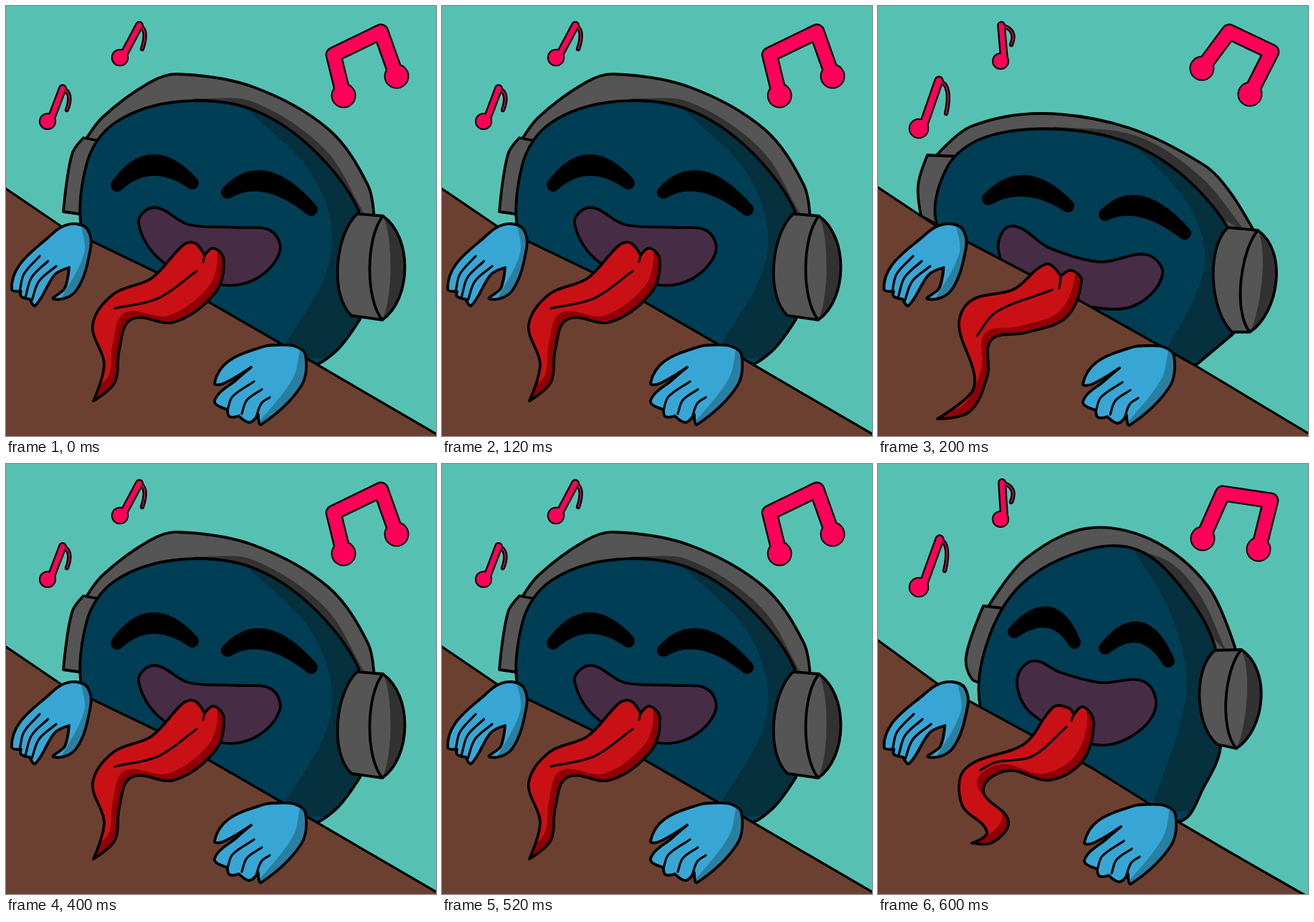
Write an HTML page that moves like this. It is 600 by 600 pixels and loops after 800 ms.

```html
<!DOCTYPE html>
<html lang="en">
<head>
<meta charset="utf-8">
<title>Headphone jam</title>
<style>
  html, body { margin: 0; width: 100%; height: 100%; overflow: hidden; background: #56c1b2; }
  svg { display: block; width: 100%; height: 100%; }
  .pose { opacity: 0; }
</style>
</head>
<body>
<svg id="stage" viewBox="0 0 600 600" fill="none" stroke-linejoin="round" stroke-linecap="round"></svg>
<script>
const INK = '#000';
const C = {
  head: '#003e55', headDark: '#05303e', mouth: '#472c45',
  tongue: '#c91115', tongueDark: '#8f0006',
  hand: '#38a6d4', handDark: '#2a7fa0',
  grey: '#555', greyDark: '#323232',
  table: '#6b4030', note: '#ff0059'
};
const STEP = 200;
const ORDER = [0, 1, 0, 2];

// Key points are "x,y"; a trailing "!" marks a sharp corner.
const POSES = [
  {
    table: '0,255 78,308 215,374 425,495 600,597',
    head: '110,330 112,222 152,163 245,133 350,147 445,217 500,310 494,437! 460,482 420,503 200,480',
    headShade: '335,142 430,240 453,350 378,492',
    band: '108,192! 135,155 200,107 240,95 345,113 450,172 505,250 514,300! 480,330! 130,260!',
    bandShade: '262,129 345,134 445,200 500,290',
    cupL: '108,184! 140,190! 115,292! 80,287! 92,207',
    cupR: '490,290 526,293 525,438 482,432',
    eyes: ['155,250 205,222 260,247', '309,260 363,245 426,284'],
    mouth: '185,303 207,281 255,305 325,309 370,314 382,343 350,380 302,389 220,358',
    tongue: '122,551! 137,500 121,445 150,402 203,380 248,333 264,331 277,348! 290,338 304,355 292,400 235,441 175,437 158,480 152,525',
    creases: ['152,422 212,408 266,370', '277,348 275,357'],
    handL: 'scale(1 1)', handR: 'translate(0 0)',
    notes: ['159,72 186,27 190,60', '58,161 79,115 85,145'],
    beam: '471,125 457,68 523,36 545,98'
  },
  {
    table: '0,253 75,303 283,412 445,503 600,596',
    head: '84,310 96,226 150,183 255,172 362,196 452,262 505,350 496,457! 445,500! 200,480',
    headShade: '354,190 435,280 455,365 395,495',
    band: '82,208! 130,168 230,150 350,170 455,222 490,258 524,313! 480,340! 106,250!',
    bandShade: '243,168 360,181 450,238 513,315',
    cupL: '69,208! 112,210! 95,312! 60,293! 56,250',
    cupR: '488,309 530,313 519,455 494,455',
    eyes: ['154,269 207,251 265,279', '317,291 368,280 428,317'],
    mouth: '168,340 186,307 240,338 310,357 375,347 397,375 360,417 305,421 200,395',
    tongue: '83,576! 130,540 134,512 113,445 130,411 190,395 235,360 255,377! 270,369 284,384 262,435 205,456 158,466 153,515 128,566',
    creases: ['138,460 165,427 243,396', '255,377 253,394'],
    handL: 'scale(1.04 1)', handR: 'translate(-5 1)',
    notes: ['171,77 172,27 186,54', '57,171 85,104 95,150'],
    beam: '452,87 490,36 549,64 519,123'
  },
  {
    table: '0,246 82,306 300,425 420,500 490,541 600,604',
    head: '143,340 152,250 200,168 290,120 365,121 430,181 472,262 478,394 455,450 419,499 200,480',
    headShade: '354,114 411,215 430,320 380,485',
    band: '152,202! 205,133 290,90 380,105 460,170 500,262! 460,300! 170,260!',
    bandShade: '355,117 410,139 450,184 487,264',
    cupL: '147,198! 180,202! 150,306! 131,300 123,268',
    cupR: '470,260 507,259 500,397 473,391',
    eyes: ['190,234 238,214 274,249', '317,257 365,235 405,275'],
    mouth: '194,303 215,275 255,291 310,305 372,304 387,342 350,382 300,391 214,348',
    tongue: '131,529! 152,513 117,475 122,425 205,390 245,339 267,341 273,350! 287,339 301,362 285,415 240,441 180,428 147,455 182,498 160,528',
    creases: ['143,427 165,416 215,408 263,367', '273,350 270,358'],
    handL: 'scale(1.06 1)', handR: 'translate(-3 2)',
    notes: ['171,77 173,26 186,53', '57,172 86,105 93,149'],
    beam: '453,104 481,41 548,51 531,119'
  }
];

// Each finger line repeats the first one, moved on by a fixed step.
const HANDS = {
  handL: {
    edge: '78,308 98,304 114,312 118,338 98,397 67,409 82,394 88,365! 68,375 41,418 33,409! 21,405 21,398! 8,395 19,361 60,322',
    shade: '104,302 109,345 75,412',
    lines: { from: [19, 399, 8.5, 6], via: [25, 374, 10.5, 5], to: [47, 349, 11.5, 7] }
  },
  handR: {
    edge: '381,473 404,475 418,487 412,530 356,584 352,570! 340,581 325,572! 312,573 309,563! 291,551 322,521 342,504! 303,527 291,526 310,496 360,475',
    shade: '411,474 400,520 345,590',
    lines: { from: [309, 564, 20, 5], via: [316, 545, 20, 5], to: [346, 524, 11, 11] }
  }
};

const points = text => text.split(' ').map(s => {
  const [x, y] = s.split(',').map(parseFloat);
  return { x, y, sharp: s.endsWith('!') };
});

// Smooth path through the points, with handles scaled to each span.
function curve(text, closed = true) {
  const pts = points(text);
  const n = pts.length;
  const at = i => closed ? pts[(i + n) % n] : pts[Math.max(0, Math.min(n - 1, i))];
  const handle = (i, len) => {
    const p = at(i), a = at(i - 1), b = at(i + 1);
    const dx = b.x - a.x, dy = b.y - a.y;
    const k = p.sharp ? 0 : len / 3 / (Math.hypot(dx, dy) || 1);
    return [dx * k, dy * k];
  };
  let d = `M${pts[0].x} ${pts[0].y}`;
  for (let i = 0; i < (closed ? n : n - 1); i++) {
    const p = at(i), q = at(i + 1);
    const len = Math.hypot(q.x - p.x, q.y - p.y);
    const [ax, ay] = handle(i, len), [bx, by] = handle(i + 1, len);
    d += `C${p.x + ax} ${p.y + ay} ${q.x - bx} ${q.y - by} ${q.x} ${q.y}`;
  }
  return closed ? d + 'Z' : d;
}

// Bulging edge from p to q, k pixels sideways at its middle.
function bow(p, q, k) {
  const side = k * 4 / 3, dy = (q.y - p.y) / 5;
  return `C${p.x + side} ${p.y + dy} ${q.x + side} ${q.y - dy} ${q.x} ${q.y}`;
}

const stage = document.getElementById('stage');
let clips = 0;

function add(parent, tag, attrs) {
  const el = document.createElementNS('http://www.w3.org/2000/svg', tag);
  for (const k in attrs) el.setAttribute(k, attrs[k]);
  parent.appendChild(el);
  return el;
}

function line(g, d, width = 3.2) {
  add(g, 'path', { d, stroke: INK, 'stroke-width': width });
}

// Filled, outlined shape with an optional second tone clipped inside it.
function shape(g, d, fill, tone, toneFill, toneMove = '') {
  add(g, 'path', { d, fill });
  if (tone) {
    const id = 'clip' + clips++;
    add(add(g, 'clipPath', { id }), 'path', { d });
    const inner = add(g, 'g', { 'clip-path': `url(#${id})` });
    add(inner, 'path', { d: tone, fill: toneFill, transform: toneMove });
  }
  line(g, d, 3.8);
}

// Strokes and dots that share one outline.
function tubes(g, strokes, dots) {
  for (const [color, grow] of [[INK, 4], [C.note, 0]]) {
    strokes.forEach(([d, w]) => add(g, 'path', { d, stroke: color, 'stroke-width': w + grow * 1.2 }));
    dots.forEach(([p, r]) => add(g, 'circle', { cx: p.x, cy: p.y, r: r + grow / 2, fill: color }));
  }
}

function note(g, text) {
  const [h, t, f] = points(text);
  const r = Math.hypot(t.x - h.x, t.y - h.y) / 10 + 5;
  const stem = `M${h.x + r / 2} ${h.y - 4}L${t.x} ${t.y}`;
  const flag = `M${t.x} ${t.y}Q${f.x + 9} ${t.y + 6} ${f.x} ${f.y}`;
  tubes(g, [[flag, 1.5], [stem, r * .7]], [[h, r]]);
}

function beam(g, text) {
  const pts = points(text);
  tubes(g, [['M' + text, 18]], [[pts[0], 15.5], [pts[3], 15.5]]);
}

function eye(g, text) {
  const [a, m, b] = points(text);
  const ctrl = k => `${2 * m.x - (a.x + b.x) / 2} ${2 * (m.y + k) - (a.y + b.y) / 2}`;
  const d = `M${a.x} ${a.y}Q${ctrl(-6)} ${b.x} ${b.y}Q${ctrl(6)} ${a.x} ${a.y}Z`;
  add(g, 'path', { d, fill: INK, stroke: INK, 'stroke-width': 18 });
}

function rightCup(g, text) {
  const [a, top, foot, b] = points(text);
  const start = `M${top.x} ${top.y}`;
  shape(g, `M${b.x} ${b.y}${bow(b, a, -23)}L${top.x} ${top.y}L${foot.x} ${foot.y}Z`, C.grey);
  shape(g, start + bow(top, foot, 31) + bow(foot, top, -18), C.grey,
    start + bow(top, foot, 11) + 'H600V200Z', C.greyDark);
}

function hand(pose, name, move) {
  const { edge, shade, lines } = HANDS[name];
  const g = add(pose, 'g', { transform: move });
  shape(g, curve(edge), C.hand, curve(shade, false) + 'H450V300Z', C.handDark);
  for (let i = 0; i < 3; i++) {
    const at = ([x, y, dx, dy]) => `${x + dx * i},${y + dy * i}`;
    line(g, curve([lines.from, lines.via, lines.to].map(at).join(' '), false));
  }
}

function draw(p) {
  const g = add(stage, 'g', { class: 'pose' });
  p.notes.forEach(n => note(g, n));
  beam(g, p.beam);

  shape(g, curve(p.band), C.grey, curve(p.bandShade, false), C.greyDark);
  shape(g, curve(p.cupL), C.grey);
  shape(g, curve(p.head), C.head, curve(p.headShade, false) + 'H600V100Z', C.headDark);
  p.eyes.forEach(e => eye(g, e));
  shape(g, curve(p.mouth), C.mouth);
  rightCup(g, p.cupR);

  add(g, 'path', { d: `M${p.table}V610H0Z`, fill: C.table });
  line(g, 'M' + p.table);

  const tongue = curve(p.tongue);
  shape(g, tongue, C.tongueDark, tongue, C.tongue, 'translate(-9 -9)');
  p.creases.forEach(c => line(g, curve(c, false)));
  hand(g, 'handL', p.handL);
  hand(g, 'handR', p.handR);
  return g;
}

add(stage, 'rect', { width: 600, height: 600, fill: '#56c1b2' });
POSES.map(draw).forEach((g, i) => {
  const keys = [...ORDER, ORDER[0]].map((pose, k) => ({
    opacity: pose === i ? 1 : 0, offset: k / ORDER.length, easing: 'step-end'
  }));
  g.animate(keys, { duration: STEP * ORDER.length, iterations: Infinity });
});
</script>
</body>
</html>
```
